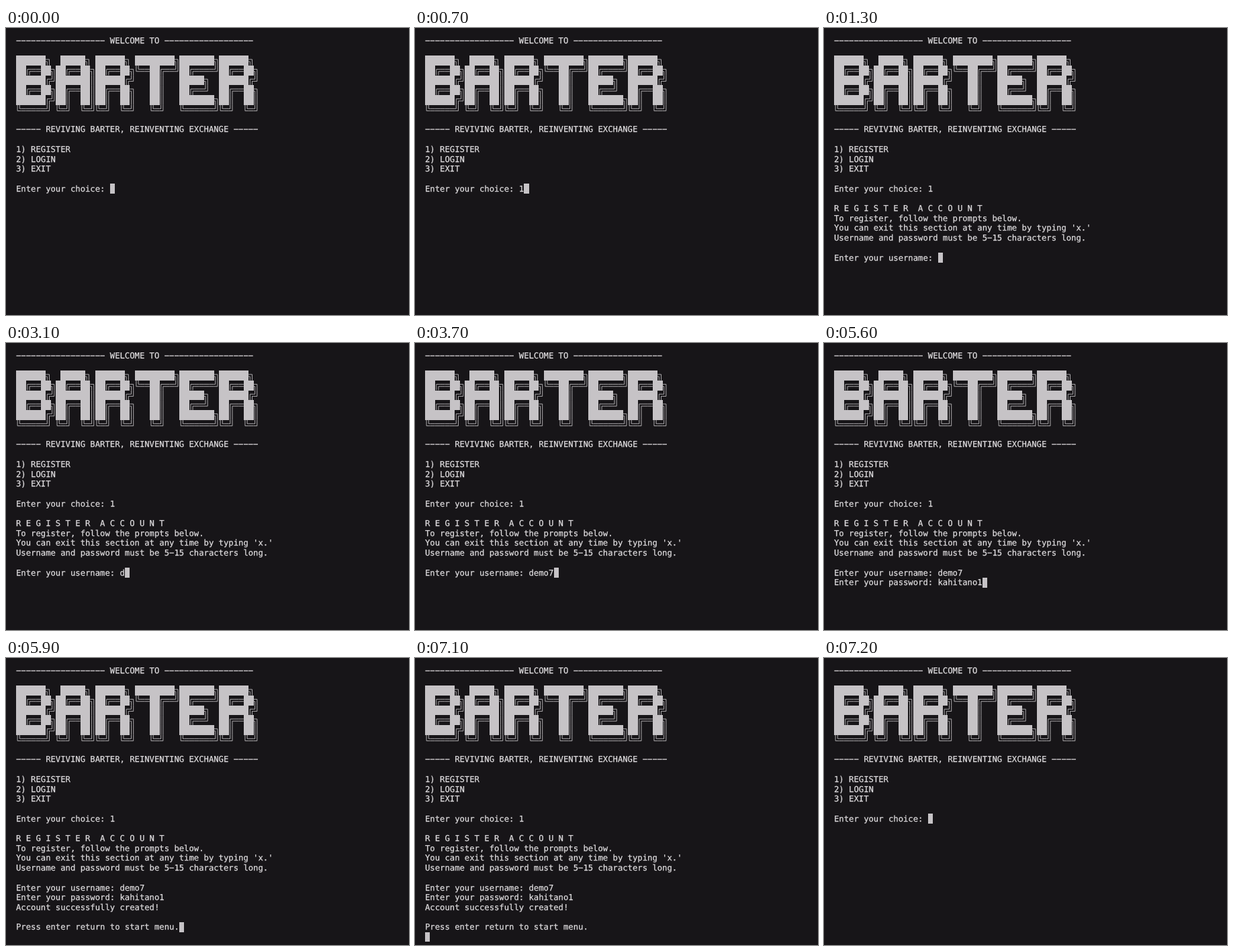
These frames come from a looping animation (600x428 px, 8.1 s). An HTML page:

```html
<!DOCTYPE html>
<html lang="en">
<head>
<meta charset="utf-8">
<title>Terminal registration</title>
<style>
  html, body { margin: 0; width: 100%; height: 100%; overflow: hidden; background: #171518; }
  pre {
    position: absolute; left: 15px; top: 12.1px; margin: 0;
    font: 12.235px/14.7px "DejaVu Sans Mono", monospace;
    text-rendering: geometricPrecision;
    color: #dedcde; -webkit-text-stroke: .25px #dedcde;
  }
  svg { position: absolute; left: 0; top: 0; }
  #blocks, #cursor { fill: #c6c3c6; shape-rendering: crispEdges; }
  #lines { fill: none; stroke: #bcb9bc; stroke-width: .9; }
</style>
</head>
<body>
<pre id="screen"></pre>
<svg width="600" height="428">
  <path id="blocks"/>
  <path id="lines"/>
  <rect id="cursor" width="7.366" height="14.7"/>
</svg>
<script>
const LOOP = 8100, CLEAR = 7200;
const LEFT = 15, TOP = 11.7, W = 7.366, H = 14.7;
const $ = id => document.getElementById(id);
const dashes = n => '−'.repeat(n);

const banner = `
██████╗  █████╗ ██████╗ ████████╗███████╗██████╗
██╔══██╗██╔══██╗██╔══██╗╚══██╔══╝██╔════╝██╔══██╗
██████╔╝███████║██████╔╝   ██║   █████╗  ██████╔╝
██╔══██╗██╔══██║██╔══██╗   ██║   ██╔══╝  ██╔══██╗
██████╔╝██║  ██║██║  ██║   ██║   ███████╗██║  ██║
╚═════╝ ╚═╝  ╚═╝╚═╝  ╚═╝   ╚═╝   ╚══════╝╚═╝  ╚═╝`.slice(1).split('\n');

const menu = `${dashes(18)} WELCOME TO ${dashes(18)}
${'\n'.repeat(8)}${dashes(5)} REVIVING BARTER, REINVENTING EXCHANGE ${dashes(5)}

1) REGISTER
2) LOGIN
3) EXIT

Enter your choice: `;

// Output and keystrokes: [time in ms, text appended]
const steps = [
  [700, '1'],
  [1300, `

R E G I S T E R  A C C O U N T
To register, follow the prompts below.
You can exit this section at any time by typing 'x.'
Username and password must be 5−15 characters long.

Enter your username: `],
  [3100, 'd'], [3200, 'e'], [3300, 'm'], [3500, 'o'], [3700, '7'],
  [4100, '\nEnter your password: '],
  [4600, 'k'], [4700, 'a'], [4900, 'h'], [5000, 'i'], [5100, 't'],
  [5200, 'a'], [5300, 'n'], [5400, 'o'], [5600, '1'],
  [5900, '\nAccount successfully created!\n\nPress enter return to start menu.'],
  [7100, '\n'],
];

// Directions of the horizontal and vertical arm of each corner
const corners = { '╔': [1, 1], '╗': [-1, 1], '╚': [1, -1], '╝': [-1, -1] };

function boxLines(ch, x, y) {
  const cx = x + W / 2, cy = y + H / 2;
  return [-1.6, 1.6].map(d => {
    if (ch === '═') return `M${x} ${cy + d}h${W}`;
    if (ch === '║') return `M${cx + d} ${y}v${H}`;
    const [sx, sy] = corners[ch];
    return `M${cx + sx * W / 2} ${cy - sy * d}H${cx - sx * d}V${cy + sy * H / 2}`;
  }).join('');
}

function drawBanner() {
  let blocks = '', lines = '';
  banner.forEach((row, r) => [...row].forEach((ch, c) => {
    const x = LEFT + c * W, y = TOP + (r + 2) * H;
    if (ch === '█') blocks += `M${x} ${y}h${W}v${H}h${-W}z`;
    else if (ch !== ' ') lines += boxLines(ch, x, y);
  }));
  $('blocks').setAttribute('d', blocks);
  $('lines').setAttribute('d', lines);
}

let shown;
function frame() {
  const t = performance.now() % LOOP;
  const typed = steps.filter(([at]) => at <= t && t < CLEAR).map(s => s[1]).join('');
  if (typed !== shown) {
    shown = typed;
    const rows = (menu + typed).split('\n');
    $('screen').textContent = menu + typed;
    $('cursor').setAttribute('x', LEFT + rows.at(-1).length * W);
    $('cursor').setAttribute('y', TOP + (rows.length - 1) * H);
  }
  requestAnimationFrame(frame);
}

drawBanner();
frame();
</script>
</body>
</html>
```
